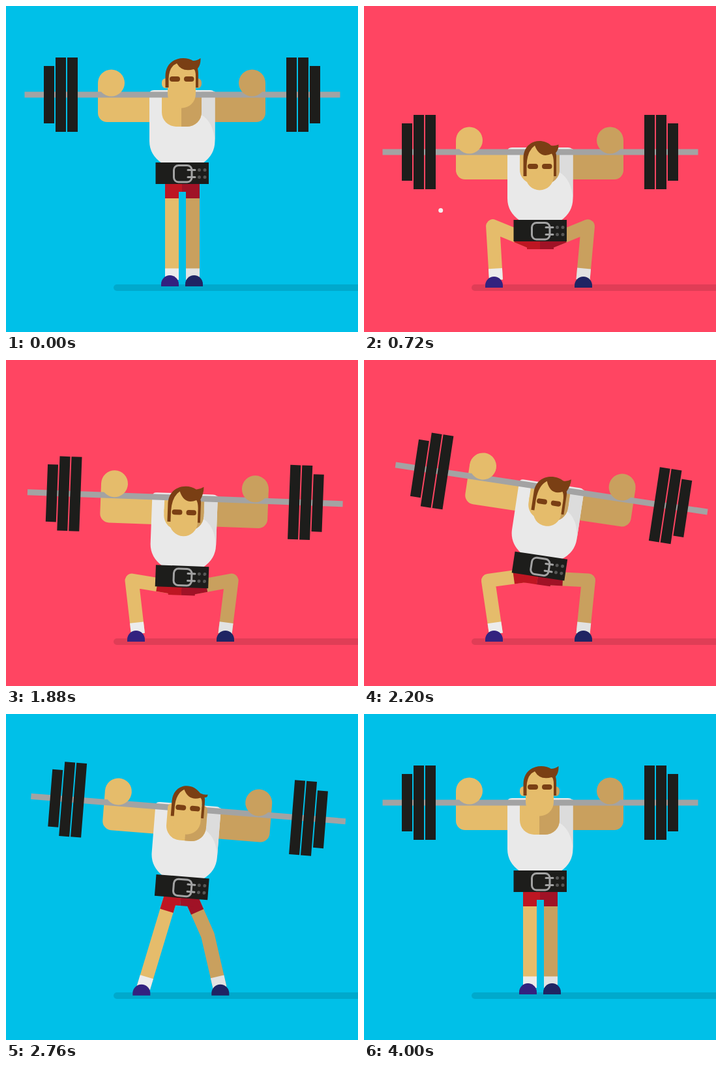
Animation, 540 px wide and 500 px high, one loop 4040 ms. Source, as an HTML page:

```html
<!DOCTYPE html>
<html lang="en">
<head>
<meta charset="utf-8">
<title>Squat</title>
<style>
html, body { margin: 0; width: 100%; height: 100%; overflow: hidden; }
svg { display: block; width: 540px; height: 500px; }
.light { fill: #e5bc6b; }
.dark { fill: #c9a05e; }
.black { fill: #1d1d1b; }
.hair { fill: #7a3f14; }
.leg path { fill: none; stroke-width: 21; stroke-linejoin: round; }
.steel { fill: none; stroke: #a3a3a3; stroke-width: 3; stroke-linecap: round; }
.holes { stroke: #575756; stroke-width: 5; stroke-linecap: round; }
</style>
</head>
<body>
<svg viewBox="0 0 540 500">
  <defs>
    <path id="shoe" d="M-13.5 17V13.5a13.5 13.5 0 0 1 27 0V17Z"/>
    <path id="arm" d="M141 118V164a14 14 0 0 0 14 14H230V136H161V118Z"/>
    <circle id="fist" cx="161.5" cy="118" r="20.5"/>
    <path id="plates" d="M58 92h16v88h-16zM76 79h16v114h-16zM94 79h16v114h-16z"/>
  </defs>

  <rect id="back" width="540" height="500"/>
  <rect x="165" y="427" width="400" height="10" rx="5" opacity=".12"/>
  <circle id="sweat" r="3.5" fill="#f4f0f0"/>

  <g class="leg" id="left">
    <path stroke="#e5bc6b"/><path stroke="#ececec"/><path stroke="#be1622"/>
    <use href="#shoe" fill="#33227f"/>
  </g>
  <g class="leg" id="right">
    <path stroke="#c9a05e"/><path stroke="#e2e2e2"/><path stroke="#a01226"/>
    <use href="#shoe" fill="#1f2463"/>
  </g>

  <g id="body">
    <path fill="#be1622" d="M250 265H270V285H250Z"/>
    <path fill="#a01226" d="M270 265H291V285H270Z"/>
    <use href="#arm" class="light"/>
    <use href="#arm" class="dark" transform="matrix(-1 0 0 1 539 0)"/>
    <path fill="#e9e9e9" d="M220 135Q220 129 227 129H313Q320.5 129 320.5 136V207Q320.5 228 302 241H239Q220 228 220 207Z"/>
    <path fill="#dcdcdc" d="M300 131H320.5V207Q318 178 300 167Z"/>
    <path class="light" d="M239 136H300V163a22 22 0 0 1-22 22H261a22 22 0 0 1-22-22Z"/>
    <path class="dark" d="M269 136H300V163a22 22 0 0 1-22 22H269Z"/>

    <rect x="28.5" y="131.5" width="484" height="9" fill="#a3a3a3"/>
    <use href="#plates" class="black"/>
    <use href="#plates" class="black" transform="matrix(-1 0 0 1 540 0)"/>
    <use href="#fist" class="light"/>
    <use href="#fist" class="dark" transform="matrix(-1 0 0 1 539 0)"/>

    <g id="head">
      <rect class="light" x="239" y="111" width="12" height="15" rx="6"/>
      <rect class="dark" x="288" y="111" width="12" height="15" rx="6"/>
      <path class="light" d="M248 100Q252 86 270 86Q288 86 291 100V135a21.5 21.5 0 0 1-43 0Z"/>
      <path class="hair" id="hair"/>
      <g class="hair" id="eyes">
        <rect x="251" y="108" width="16" height="8" rx="4"/>
        <rect x="273" y="108" width="15.5" height="8" rx="4"/>
      </g>
    </g>

    <rect class="black" x="229.5" y="240" width="81.5" height="33"/>
    <g class="steel">
      <rect x="257.5" y="244.5" width="27.5" height="25.5" rx="7"/>
      <path d="M279 251.5H290M279 262.5H290"/>
    </g>
    <path class="holes" d="M296.5 251.5h0m8.5 0h0m0 11h0m-8.5 0h0"/>
  </g>
</svg>
<script>
const LOOP = 4040, PIVOT = [270, 251], THIGH = 61.5, SHIN = 82.5;
const el = id => document.getElementById(id);
const place = (node, transform) => node.setAttribute("transform", transform);
const trace = (node, d) => node.setAttribute("d", d);

const progress = (t, from, to) => Math.min(1, Math.max(0, (t - from) / (to - from)));
const bump = (t, from, to) => Math.sin(Math.PI * progress(t, from, to));
function ease(t, from, to) {
  const p = progress(t, from, to);
  return p * p * (3 - 2 * p);
}

// Squat, strain, slow crooked lift, then a snap upright that settles.
function pose(t) {
  return {
    drop: 88 * ease(t, 400, 650) - 12 * ease(t, 960, 1440) - 40 * ease(t, 1840, 2660) - 36 * ease(t, 2620, 2830),
    tilt: 15.2 * ease(t, 1635, 2678) - 18.1 * ease(t, 2610, 2880) + 2.9 * ease(t, 3100, 3840)
      - .7 * Math.sin(2 * Math.PI * progress(t, 960, 1500)),
    nod: ease(t, 400, 640) - ease(t, 2620, 2900),
    spread: ease(t, 400, 580) - ease(t, 2690, 2970),
    flop: 6.5 * bump(t, 620, 820) + 13 * bump(t, 2640, 2880),
    effort: t >= 520 && t < 2680
  };
}

const mix = (a, b, u) => a.map((v, i) => v + (b[i] - v) * u);
const line = (...points) => "M" + points.join("L");
const gap = (a, b) => Math.hypot(a[0] - b[0], a[1] - b[1]);

function bendKnee(hip, ankle, side) {
  const dist = gap(hip, ankle), reach = THIGH + SHIN;
  if (dist >= reach) return mix(ankle, hip, SHIN / reach);
  const along = (SHIN ** 2 - THIGH ** 2 + dist ** 2) / (2 * dist);
  const out = side * Math.sqrt(SHIN ** 2 - along ** 2);
  const [x, y] = mix(ankle, hip, along / dist);
  return [x - (hip[1] - ankle[1]) * out / dist, y + (hip[0] - ankle[0]) * out / dist];
}

function drawLeg(id, side, hip, footX, footY, ankleX) {
  const ankle = [ankleX, 420], knee = bendKnee(hip, ankle, side);
  const [skin, sock, shorts, shoe] = el(id).children;
  trace(skin, line(hip, knee, ankle));
  trace(sock, line(ankle, mix(ankle, knee, 17.5 / gap(ankle, knee))));
  trace(shorts, line(hip, mix(hip, knee, 22 / gap(hip, knee))));
  place(shoe, `translate(${footX} ${footY})`);
}

function drawHair(nod, flop) {
  const end = 125 + 10 * nod, h = 7 * nod;
  trace(el("hair"), `M244.5 ${end}V107C245 80 273 75 287 ${84 + flop * .6}
    Q293 ${84 + flop * .8} 298.5 ${80 + flop}Q299 ${90 + flop * .6} 294 ${96 + h / 2}Q295 100 295 106V${end}
    H291V${108 + h}Q291 ${98 + h} 288 ${97 + h / 2}Q270 ${102 + h} 262 88
    Q250 ${93 + h / 2} 249.5 ${112 + h}V${end}Z`);
}

function draw(now) {
  const t = now % LOOP;
  const { drop, tilt, nod, spread, flop, effort } = pose(t);
  el("back").setAttribute("fill", effort ? "#ff4562" : "#00c0e8");

  place(el("body"), `translate(0 ${drop}) rotate(${tilt} ${PIVOT})`);
  place(el("head"), `translate(0 ${38 * nod})`);
  place(el("eyes"), `translate(0 ${8 * nod})`);
  drawHair(nod, flop);

  const angle = tilt * Math.PI / 180, c = Math.cos(angle), s = Math.sin(angle);
  const hip = x => [PIVOT[0] + x * c - 22 * s, PIVOT[1] + drop + x * s + 22 * c];
  const leftX = 251.5 - 52 * spread, rightX = 288.5 + 48 * spread, footY = 413 + 2 * spread;
  drawLeg("left", -1, hip(-15.5), leftX, footY, leftX + 3);
  drawLeg("right", 1, hip(16.5), rightX, footY, rightX - 2 + 1.5 * spread);

  const fall = (t - 720) / 160;
  el("sweat").setAttribute("visibility", Math.abs(fall) < 1 ? "visible" : "hidden");
  place(el("sweat"), `translate(${118 - 50 * fall} ${313 + 80 * fall + 35 * fall * fall})`);
  requestAnimationFrame(draw);
}
requestAnimationFrame(draw);
</script>
</body>
</html>
```
